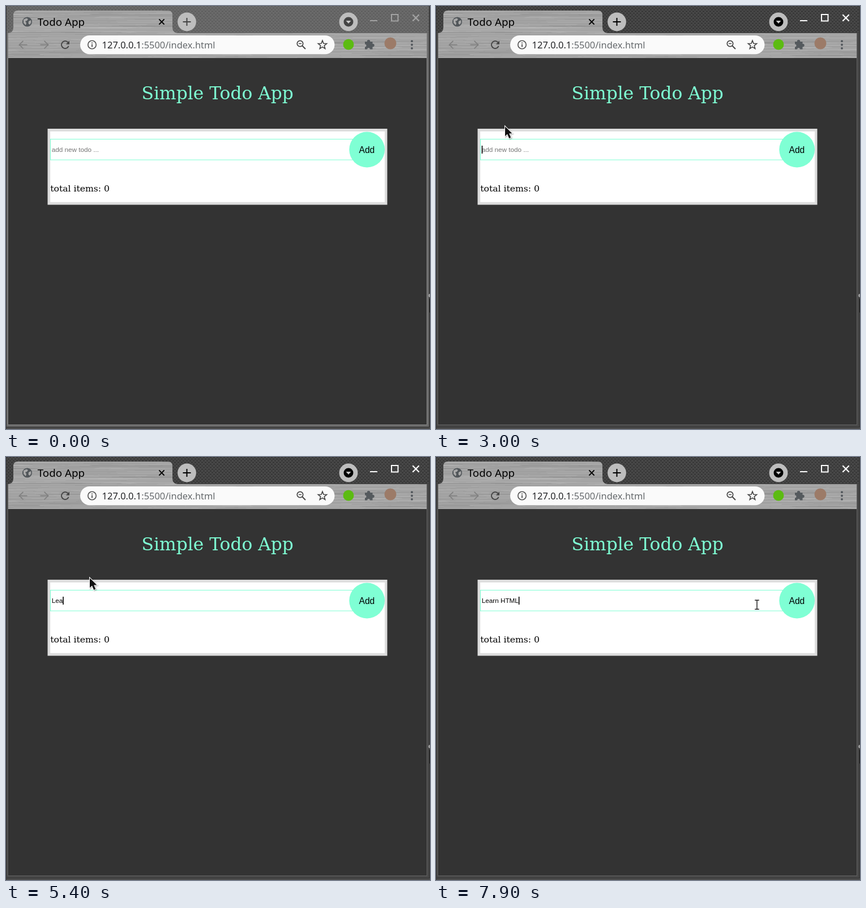
Recreate the animation shown at these times as an HTML page with a canvas. Size 749 px wide and 748 px high, loop 8 s.

```html
<!DOCTYPE html>
<html lang="en">
<head>
<meta charset="utf-8">
<title>Todo App</title>
<style>
html, body { margin: 0; width: 100%; height: 100%; overflow: hidden; background: #333; }
canvas { display: block; }
</style>
</head>
<body>
<canvas id="stage" width="749" height="748"></canvas>
<script>
const ctx = document.getElementById('stage').getContext('2d');
const LOOP = 8000, STEP = 100, TAU = Math.PI * 2;
const MINT = '#7fffd4';
const SANS = '"Liberation Sans", Arial, sans-serif';
const SERIF = '"DejaVu Serif", serif';
const UI = '"Noto Sans", "Open Sans", sans-serif';

// Pointer path: time, x, y
const PATH = [
  [200, 148, 3], [1000, 103, 66], [2999, 103, 66],
  [3000, 121, 212], [3400, 133, 237], [3800, 145, 247], [3900, 148, 242],
  [4100, 147, 229], [4299, 147, 229], [4300, 147, 220], [4500, 147, 213],
  [7199, 147, 213], [7200, 150, 214], [7300, 152, 213],
  [7400, 152, 213], [7900, 567, 261], [LOOP, 567, 261]
];
const TYPED = 'Learn HTML';
const KEY_TIMES = [4900, 5200, 5400, 5500, 5600, 5800, 6200, 6400, 6500, 6600];
const CARET_ON = [[1800, 2300], [3000, 3500], [4000, 4800], [4900, 7200], [7700, LOOP]];

function makeTexture(w, h, paint) {
  const tile = document.createElement('canvas');
  tile.width = w;
  tile.height = h;
  paint(tile.getContext('2d'));
  return ctx.createPattern(tile, 'repeat');
}

function weave(base, dark, light) {
  return makeTexture(6, 6, g => {
    g.fillStyle = base;
    g.fillRect(0, 0, 6, 6);
    g.fillStyle = dark;
    g.fillRect(0, 0, 3, 2);
    g.fillRect(3, 3, 3, 2);
    g.fillStyle = light;
    g.fillRect(0, 2, 3, 1);
    g.fillRect(3, 5, 3, 1);
  });
}

const metal = makeTexture(749, 96, g => {
  let seed = 7;
  const rnd = () => (seed = seed * 16807 % 2147483647) / 2147483647;
  g.fillStyle = '#a5a5a5';
  g.fillRect(0, 0, 749, 96);
  for (let i = 0; i < 700; i++) {
    g.fillStyle = rnd() < 0.5 ? 'rgba(255,255,255,.07)' : 'rgba(0,0,0,.05)';
    g.fillRect(rnd() * 900 - 150, Math.floor(rnd() * 96), 40 + rnd() * 220, 1);
  }
});

const THEMES = {
  idle: { frame: weave('#686868', '#5d5d5d', '#727272'), edge: '#6b6b6b', line: '#838383', control: '#a4a4a4', icon: '#444' },
  active: { frame: weave('#454545', '#353535', '#505050'), edge: '#484848', line: '#606060', control: '#fff', icon: '#000' }
};

function rect(x, y, w, h, fill) {
  ctx.fillStyle = fill;
  ctx.fillRect(x, y, w, h);
}

function disc(x, y, r, fill) {
  ctx.fillStyle = fill;
  ctx.beginPath();
  ctx.arc(x, y, r, 0, TAU);
  ctx.fill();
}

function ring(x, y, r, color, width, from = 0, to = TAU) {
  ctx.strokeStyle = color;
  ctx.lineWidth = width;
  ctx.beginPath();
  ctx.arc(x, y, r, from, to);
  ctx.stroke();
}

function trace(points) {
  ctx.beginPath();
  points.forEach(([x, y], i) => i ? ctx.lineTo(x, y) : ctx.moveTo(x, y));
}

function line(points, color, width) {
  trace(points);
  ctx.strokeStyle = color;
  ctx.lineWidth = width;
  ctx.stroke();
}

function polygon(points, fill) {
  trace(points);
  ctx.closePath();
  ctx.fillStyle = fill;
  ctx.fill();
}

function cross(x, y, r, color, width) {
  line([[x - r, y - r], [x + r, y + r]], color, width);
  line([[x + r, y - r], [x - r, y + r]], color, width);
}

function text(str, x, y, size, family, color, align = 'left') {
  ctx.font = `${size}px ${family}`;
  ctx.textAlign = align;
  ctx.fillStyle = color;
  ctx.fillText(str, x, y);
  return ctx.measureText(str).width;
}

function drawGlobe() {
  disc(37.5, 28, 8.6, '#51565a');
  polygon([[31, 24], [36, 21.5], [39, 23], [37, 26], [34, 27], [36, 30], [35, 34], [31, 30]], '#a8a8a8');
  polygon([[40, 27], [44, 25], [44.5, 29], [42, 33], [39.5, 31]], '#a8a8a8');
}

function drawWindowFrame(theme) {
  rect(0, 0, 749, 748, '#4b4b4b');
  rect(1, 0, 748, 744, theme.edge);
  rect(1, 0, 748, 48, theme.frame);
  rect(0, 0, 1, 748, '#303030');
  rect(3, 48, 1, 693, theme.line);
  rect(4, 92, 1, 648, '#2b2b2b');
  rect(743, 48, 1, 693, theme.line);
  rect(747, 0, 2, 744, '#3a3a3a');
  rect(4, 740, 740, 1, theme.line);
  rect(0, 744, 749, 1, '#333');
  disc(749, 512, 3, '#999');
  rect(748, 518, 1, 24, '#111');

  line([[643, 26], [656, 26]], theme.control, 2);
  ctx.strokeRect(681, 15, 11.5, 11.5);
  cross(724, 21, 5.7, theme.control, 2);
}

function drawTabs(theme, hasIcon) {
  ctx.beginPath();
  ctx.moveTo(4, 48);
  ctx.quadraticCurveTo(13, 47, 13, 38);
  ctx.lineTo(13, 16);
  ctx.quadraticCurveTo(13, 8, 21, 8);
  ctx.lineTo(286, 8);
  ctx.quadraticCurveTo(294, 8, 294, 16);
  ctx.lineTo(294, 38);
  ctx.quadraticCurveTo(294, 47, 303, 48);
  ctx.fillStyle = metal;
  ctx.fill();
  if (hasIcon) drawGlobe();
  text('Todo App', 55.7, 35, 18.8, UI, '#000');
  cross(275, 28, 4.6, '#000', 2);

  disc(319.5, 28, 16.4, '#bdbdbd');
  line([[312.5, 28], [326.5, 28]], theme.icon, 2);
  line([[319.5, 21], [319.5, 35]], theme.icon, 2);
  disc(605, 28, 16.4, '#bdbdbd');
  disc(605, 28, 8.5, theme.icon);
  polygon([[600.5, 26], [609.5, 26], [605, 31]], '#c8c8c8');
}

function drawArrow(x, dir) {
  line([[x - dir * 7, 68.5], [x + dir * 7, 68.5]], '#808080', 1.7);
  line([[x, 61.7], [x + dir * 7, 68.5], [x, 75.3]], '#808080', 1.7);
}

function drawReload(hover) {
  const color = hover ? '#777' : '#444';
  if (hover) disc(105, 68.5, 16.2, '#929292');
  ring(104.5, 68.5, 6.5, color, 1.9, 0.35, TAU - 0.7);
  polygon([[112, 61.5], [112, 67.7], [105.8, 67.7]], color);
}

function drawStar(x, y) {
  const points = Array.from({ length: 10 }, (_, i) => {
    const r = i % 2 ? 3.4 : 8, a = i * TAU / 10 - TAU / 4;
    return [x + r * Math.cos(a), y + r * Math.sin(a)];
  });
  trace(points);
  ctx.closePath();
  ctx.strokeStyle = '#444';
  ctx.lineWidth = 1.6;
  ctx.stroke();
}

function drawToolbar(hover) {
  rect(4, 48, 739, 44, metal);
  drawArrow(30.5, -1);
  drawArrow(67.5, 1);
  drawReload(hover);

  ctx.beginPath();
  ctx.roundRect(131, 52, 449.5, 33.2, 16.6);
  ctx.fillStyle = '#fafafa';
  ctx.fill();
  ring(152, 68.5, 7.2, '#505050', 1.6);
  rect(151.1, 67.5, 1.8, 5, '#505050');
  rect(151.1, 64.4, 1.8, 1.8, '#505050');
  const hostWidth = text('127.0.0.1', 169.6, 74.5, 16.45, UI, '#202124');
  text(':5500/index.html', 169.6 + hostWidth, 74.5, 16.45, UI, '#666a6d');

  ring(519.5, 66.5, 5.2, '#444', 1.7);
  line([[517, 66.5], [522, 66.5]], '#444', 1.4);
  line([[523.5, 70.5], [529, 76]], '#444', 2);
  drawStar(559, 69);

  disc(605, 68, 9.5, '#5cbb12');
  rect(634, 63, 13.5, 13.5, '#555a5e');
  disc(640.5, 62.5, 2.7, '#555a5e');
  disc(648, 69.5, 2.7, '#555a5e');
  disc(634.2, 70, 2.4, '#a5a5a5');
  disc(640.5, 76.5, 2.4, '#a5a5a5');
  disc(679, 66, 10.5, '#9c7b68');
  for (const y of [62.2, 68.5, 74.8]) disc(717, y, 1.9, '#50555a');
}

function drawPage(t) {
  rect(5, 92, 738, 648, '#333');
  text('Simple Todo App', 373.7, 165, 31.29, SERIF, MINT, 'center');
  rect(73.5, 217, 600, 134.5, '#ddd');
  rect(78.2, 221.8, 590.8, 125, '#fff');
  rect(78, 235, 560, 37.6, MINT);
  rect(79, 236, 559, 35.6, '#fff');
  disc(637.7, 254, 31.4, MINT);
  text('Add', 637.4, 260, 15.64, SANS, '#000', 'center');
  text('total items: 0', 78.2, 328, 15.64, SERIF, '#000');

  const value = TYPED.slice(0, KEY_TIMES.filter(k => k <= t).length);
  const width = text(value || 'add new todo ...', 80.7, 258, 11.73, SANS, value ? '#000' : '#757575');
  if (CARET_ON.some(([on, off]) => t >= on && t < off)) {
    rect(80.7 + (value ? width : 0), 247, 1.6, 14, '#000');
  }
}

function pointerAt(t) {
  const i = PATH.findIndex(p => p[0] > t);
  const [t0, x0, y0] = PATH[i - 1], [t1, x1, y1] = PATH[i];
  const k = (t - t0) / (t1 - t0);
  return { x: x0 + (x1 - x0) * k, y: y0 + (y1 - y0) * k };
}

function outlined(draw) {
  draw('#fff', 3.2);
  draw('#000', 1.3);
}

function drawPointer({ x, y }) {
  ctx.save();
  ctx.translate(x, y);
  if (x > 79 && x < 606 && y > 235 && y < 272) {
    outlined((color, width) => {
      line([[0, -7.5], [0, 8]], color, width);
      for (const end of [-7.8, 8.2]) line([[-3.8, end], [3.8, end]], color, width);
    });
  } else {
    const shape = [[1, 1], [1, 18.3], [5, 14.6], [8.2, 22], [11.3, 20.6], [8.2, 13.5], [13.4, 13.2]];
    ctx.shadowColor = 'rgba(0,0,0,.35)';
    ctx.shadowBlur = 2;
    ctx.shadowOffsetX = ctx.shadowOffsetY = 1;
    line([...shape, shape[0], shape[1]], '#fff', 2);
    ctx.shadowColor = 'transparent';
    polygon(shape, '#111');
  }
  ctx.restore();
}

function render(now) {
  const t = Math.floor(now % LOOP / STEP) * STEP;
  const theme = t < 1600 ? THEMES.idle : THEMES.active;
  const pointer = t >= 200 ? pointerAt(t) : null;
  const hover = pointer !== null && Math.hypot(pointer.x - 105, pointer.y - 68.5) < 16;
  drawWindowFrame(theme);
  drawTabs(theme, t < 1600 || t >= 1800);
  drawToolbar(hover);
  drawPage(t);
  if (pointer) drawPointer(pointer);
}

const start = performance.now();
function tick() {
  render(performance.now() - start);
  requestAnimationFrame(tick);
}
tick();
</script>
</body>
</html>
```
